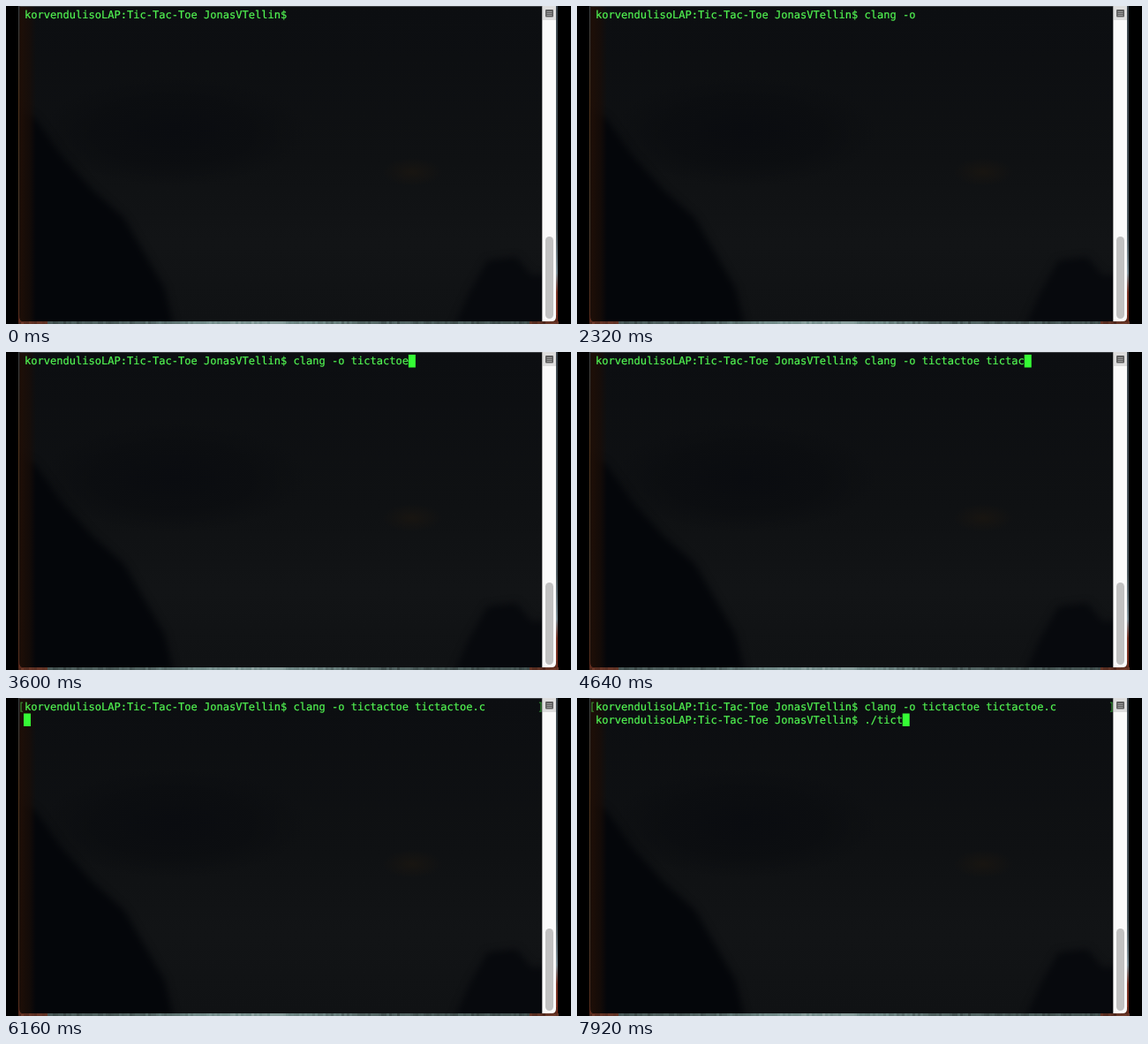
Write an HTML page that moves like this. It is 640x360 px and loops after 8 s.

```html
<!DOCTYPE html>
<html lang="en">
<head>
<meta charset="utf-8">
<title>Terminal</title>
<style>
  html, body { margin: 0; width: 100%; height: 100%; overflow: hidden; background: #000; }
  svg { display: block; width: 100vw; height: 100vh; }
  text {
    font: 12.067px "DejaVu Sans Mono", monospace;
    fill: #52f552; stroke: #52f552; stroke-width: .2;
    white-space: pre; text-rendering: geometricPrecision;
  }
  .mark { opacity: .55; }
</style>
</head>
<body>
<svg viewBox="0 0 640 360">
  <defs>
    <linearGradient id="sky" x2="0" y2="1">
      <stop offset="0" stop-color="#0c0e11"/>
      <stop offset=".5" stop-color="#0f1113"/>
      <stop offset=".75" stop-color="#121416"/>
      <stop offset="1" stop-color="#101214"/>
    </linearGradient>
    <linearGradient id="rust">
      <stop offset="0" stop-color="#1f0f07"/>
      <stop offset=".6" stop-color="#1a0d07" stop-opacity=".7"/>
      <stop offset="1" stop-color="#1a0d07" stop-opacity="0"/>
    </linearGradient>
    <linearGradient id="edge" x2="0" y2="1">
      <stop offset="0" stop-color="#3c4245"/>
      <stop offset=".3" stop-color="#50341c"/>
      <stop offset=".7" stop-color="#4c3d2e"/>
      <stop offset="1" stop-color="#5a2f1c"/>
    </linearGradient>
    <linearGradient id="rim" x2="0" y2="1">
      <stop offset="0" stop-color="#39434a"/>
      <stop offset=".7" stop-color="#4a565c"/>
      <stop offset=".84" stop-color="#7d8f98"/>
      <stop offset=".9" stop-color="#7a3527"/>
      <stop offset="1" stop-color="#7c2c1c"/>
    </linearGradient>
    <radialGradient id="cloud">
      <stop offset="0" stop-color="#0a0c10"/>
      <stop offset=".6" stop-color="#0b0d10" stop-opacity=".8"/>
      <stop offset="1" stop-color="#0b0d10" stop-opacity="0"/>
    </radialGradient>
    <radialGradient id="glow">
      <stop offset="0" stop-color="#181511"/>
      <stop offset="1" stop-color="#181511" stop-opacity="0"/>
    </radialGradient>
    <filter id="soft" x="-20%" y="-20%" width="140%" height="140%" color-interpolation-filters="sRGB">
      <feGaussianBlur stdDeviation="4"/>
    </filter>
    <clipPath id="pane"><path d="M15.5 0H607V357H20Q15.5 357 15.5 352Z"/></clipPath>
  </defs>

  <rect width="640" height="360"/>
  <rect x="14" width="1.5" height="358" fill="url(#edge)"/>
  <rect x="623" width="2" height="360" fill="url(#rim)"/>
  <g id="ground"></g>

  <g clip-path="url(#pane)">
    <rect x="15" width="592" height="357" fill="url(#sky)"/>
    <ellipse cx="190" cy="142" rx="150" ry="62" fill="url(#cloud)"/>
    <ellipse cx="460" cy="188" rx="34" ry="16" fill="url(#glow)"/>
    <g filter="url(#soft)">
      <path d="M-20 96L34 128L62 168L98 208L134 240L158 282L180 320L194 380H-20Z" fill="#04060a"/>
      <path d="M500 380L524 326L545 288L578 284L596 306L630 300V380Z" fill="#07090d"/>
    </g>
    <rect x="15" width="19" height="357" fill="url(#rust)"/>
    <rect x="15" width="592" height=".8" fill="#4a4d50"/>
  </g>

  <path d="M607 0H623V352Q623 357 618 357H607Z" fill="#fafafa"/>
  <rect x="607" width="1" height="357" fill="#a8a8a8"/>
  <rect x="608" width="15" height="16" fill="#dedede"/>
  <rect x="611" y="4" width="9" height="8.5" rx="1" fill="#5e5e5e"/>
  <path d="M612.5 6.5h6M612.5 8.5h6M612.5 10.5h6" stroke="#b4b4b4" stroke-width=".7"/>
  <rect x="611" y="261" width="9" height="93" rx="4.5" fill="#c1c1c1"/>

  <rect id="cursor" width="8" height="14.5" fill="#35fb35"/>
  <text id="line0" y="14.2"></text>
  <text id="line1" y="28.7"></text>
  <g id="marks">
    <text id="open" class="mark" y="14.2"></text>
    <text id="close" class="mark" y="14.2"></text>
  </g>
</svg>
<script>
const LOOP = 8000, BLINK = 600;
const LEFT = 20.9, PITCH = 7.265, ROW = 14.5;
const PROMPT = 'korvendulisoLAP:Tic-Tac-Toe JonasVTellin$ ';
const ENTER = 5700, READY = 6320;
const $ = id => document.getElementById(id);

// Each burst of typing: text, first key, last key
const bursts = [
  ['clang ', 420, 1080],
  ['-o', 1460, 1680],
  [' ', 2420, 2420],
  ['tictactoe', 2580, 3500],
  [' ', 3760, 3760],
  ['tictac', 3960, 4600],
  ['toe', 4690, 4930],
  ['.c', 5080, 5280],
  ['./', 6960, 7200],
  ['tict', 7420, 7880]
];
const keys = bursts.flatMap(([s, from, to]) =>
  [...s].map((ch, i) => ({ ch, at: from + (to - from) * i / Math.max(1, s.length - 1) })));
const resets = [-BLINK, ...keys.map(k => k.at), ENTER, READY].sort((a, b) => a - b);

function typed(t, from, to) {
  return keys.filter(k => k.at >= from && k.at < to && k.at <= t).map(k => k.ch).join('');
}

function setText(id, text, col = 0) {
  $(id).textContent = text;
  $(id).setAttribute('x', LEFT + col * PITCH);
}

function show(id, on) {
  $(id).setAttribute('visibility', on ? 'visible' : 'hidden');
}

function draw(t) {
  const first = PROMPT + typed(t, 0, ENTER);
  const second = t < READY ? '' : PROMPT + typed(t, READY, LOOP);
  const sent = t >= ENTER;
  setText('line0', first);
  setText('line1', second);
  show('marks', sent);

  const last = resets.filter(r => r <= t).pop();
  const cursor = $('cursor');
  cursor.setAttribute('x', LEFT - .9 + (sent ? second : first).length * PITCH);
  cursor.setAttribute('y', 3 + (sent ? ROW : 0));
  show('cursor', Math.floor((t - last) / BLINK) % 2 === 0);
}

// Speckled strip of desktop below the window, palest left of the middle
function ground() {
  let seed = 7, out = '';
  const rnd = () => (seed = seed * 16807 % 2147483647) / 2147483647;
  for (let x = 14; x < 625; x += 3) {
    const red = x > 590 || x < 45;
    const pale = 26 * Math.exp(-(((x - 280) / 110) ** 2));
    const light = (red ? 20 : 24 + pale) + rnd() * 10;
    out += `<rect x="${x}" y="357" width="3" height="3" fill="hsl(${red ? 14 : 175} ${red ? 45 : 10}% ${light}%)"/>`;
  }
  $('ground').innerHTML = out + '<path d="M14 350H22V358H14ZM616 350H624V358H616Z" fill="#5a2a1c"/>';
}

ground();
setText('open', '[', -1);
setText('close', ']', 80);
const start = performance.now();
function tick() {
  draw((performance.now() - start) % LOOP);
  requestAnimationFrame(tick);
}
tick();
</script>
</body>
</html>
```
